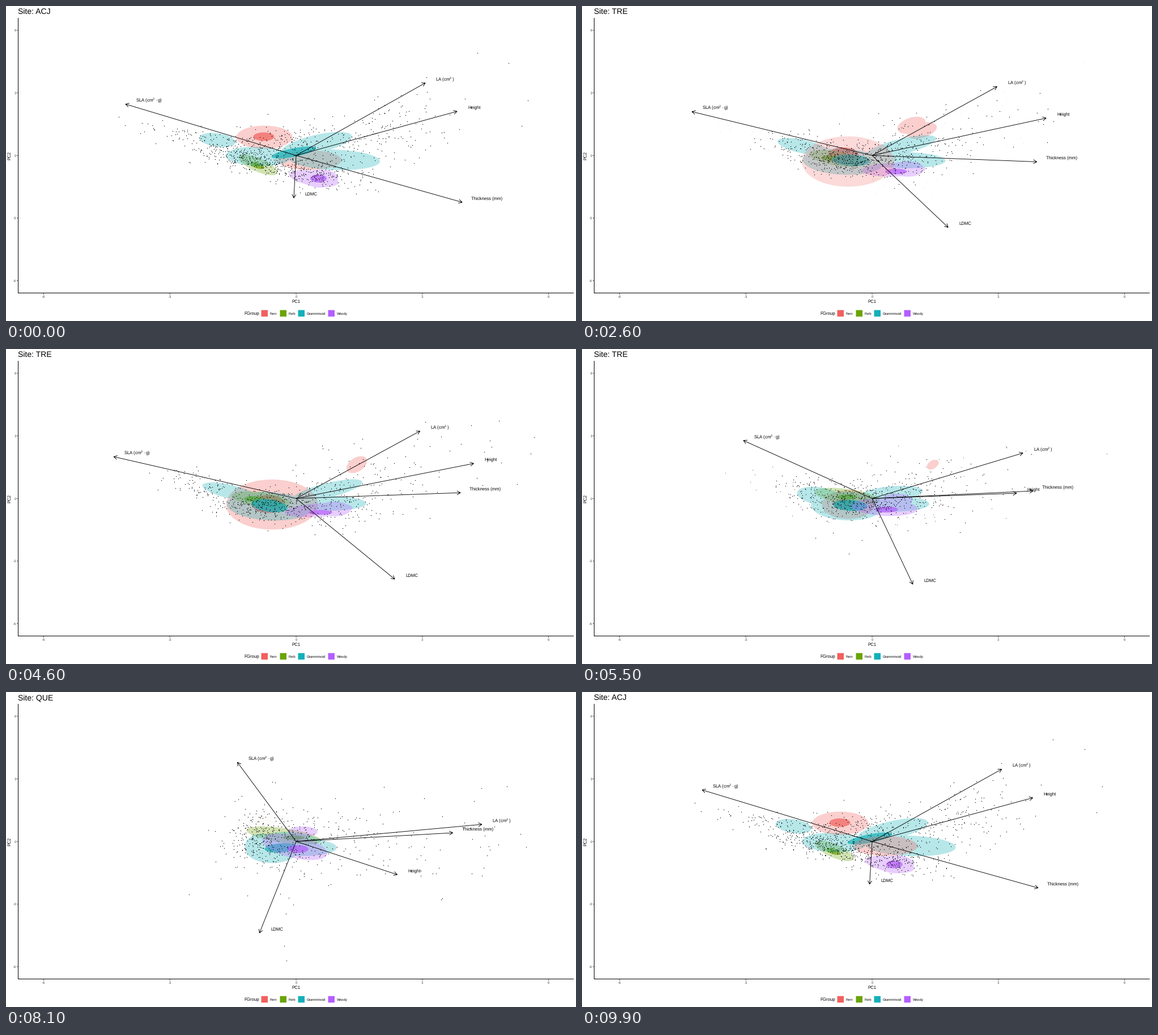
Write a matplotlib script that moves like this. It is 1006 px wide and 557 px high and loops after 10000 ms.

```python
import numpy as np
import matplotlib.pyplot as plt
from matplotlib.animation import FuncAnimation
from matplotlib.patches import PathPatch, Rectangle
from matplotlib.path import Path

W, H, DPI = 1006, 557, 100
PX = 72 / DPI  # points per pixel
ORIGIN = np.array([512, 264.3])
UNIT = np.array([74.27, -36.9])  # pixels per data unit
SITES = ["ACJ", "TRE", "QUE"]
FERN, FORB, GRAM, WOODY = "#f1605c", "#6ba304", "#13b0b8", "#b55eff"

plt.rcParams.update({
    "font.family": "Liberation Sans",
    "mathtext.default": "regular",
    "text.hinting": "none",
})


# ---- density regions: unions of ovals -------------------------------------
def oval(cx, cy, rx, ry, tilt=0):
    th = np.linspace(0, 2 * np.pi, 90)
    x, y = rx * np.cos(th), ry * np.sin(th)
    c, s = np.cos(np.radians(tilt)), np.sin(np.radians(tilt))
    return np.column_stack([cx + c * x - s * y, cy + s * x + c * y])


OUT, IN = 0.3, 0.7
fern_spot = oval(619, 204.5, 20, 12, -33)

# colour, alpha, ovals at each site (None where the region is absent)
LAYERS = [
    (FERN, OUT, [[oval(456, 232, 49.5, 20.5), oval(535.5, 272.5, 56.5, 17.5)],
                 [fern_spot, fern_spot], None]),
    (FERN, OUT, [None, [oval(469.5, 275, 81.5, 44.5)], None]),
    (FERN, IN, [[oval(455, 231, 18.5, 7.5)], [oval(463, 274, 29.5, 16)], None]),
    (FORB, OUT, [[oval(445, 281, 37, 12, 23)], [oval(450, 266, 52, 13, 7)],
                 [oval(491, 253, 67, 13, 8)]]),
    (FORB, IN, [[oval(443.5, 282, 13, 5, 18)], [oval(436, 265, 16, 5)],
                [oval(509.5, 257, 19, 3.8)]]),
    (GRAM, OUT, [
        [oval(373, 237, 32, 12, 8), oval(445, 266, 57, 17, 2),
         oval(548, 244, 64, 16, -13), oval(580, 272, 80, 18, 2)],
        [oval(395, 252, 50, 12, 13), oval(465, 278, 75, 25, 3),
         oval(568, 250, 63, 13, -14), oval(568, 273, 68, 13)],
        [oval(455, 272, 31, 21), oval(470, 277, 47, 26),
         oval(515, 264, 50, 14, 10), oval(525, 275, 57, 15)]]),
    (GRAM, IN, [[oval(508, 259, 40, 7.5, -11)], [oval(465, 277, 32, 11, 8)],
                [oval(484, 276, 28, 8, -4)]]),
    (WOODY, OUT, [[oval(543, 305, 44, 13, 10), oval(555, 305, 31, 16)],
                  [oval(552, 285, 60, 12, -4), oval(580, 283, 29, 13)],
                  [oval(509, 273, 59, 20, 13), oval(523, 246, 26, 9.5)]]),
    (WOODY, IN, [[oval(551.5, 305, 14.5, 7)], [oval(555, 289, 21, 4.2)],
                 [oval(514.5, 277, 18.5, 6.8)]]),
]

# ---- point clouds ---------------------------------------------------------
rng = np.random.default_rng(12)


def cloud(*parts):
    """Shuffled mix of normal clouds: count, centre, spread, correlation."""
    groups = []
    for n, cx, cy, sx, sy, r in parts:
        u, v = rng.normal(size=(2, n))
        groups.append(np.column_stack(
            [cx + sx * u, cy + sy * (r * u + np.sqrt(1 - r * r) * v)]))
    return rng.permutation(np.vstack(groups))


POINTS = [
    cloud((300, 430, 270, 45, 14, .5), (240, 545, 293, 42, 14, .25),
          (230, 510, 242, 70, 16, 0), (90, 335, 234, 50, 16, .75),
          (130, 660, 228, 55, 33, -.5), (10, 830, 165, 80, 45, 0)),
    cloud((330, 460, 276, 50, 15, .2), (90, 345, 240, 35, 14, .5),
          (130, 560, 270, 50, 20, 0), (140, 645, 240, 75, 33, -.3),
          (14, 830, 165, 70, 30, 0)),
    cloud((280, 450, 257, 36, 26, 0), (160, 515, 262, 45, 30, 0),
          (80, 610, 260, 75, 34, 0), (35, 790, 270, 75, 50, 0),
          (18, 470, 270, 70, 110, 0)),
]

# label, gap to the tip, tip at each site
ARROWS = [
    (r"SLA (cm$^2\,$·$\,$g)", 18, [(211, 173.5), (189, 190.8), (413, 123.3)]),
    (r"LA (cm$^2\,$)", 18.5, [(740, 136), (730, 144.7), (842, 236.3)]),
    ("Height", 19, [(796, 186.3), (826, 201.8), (688, 326)]),
    ("Thickness (mm)", 16.5, [(805, 347), (802, 254.2), (788, 246.8)]),
    ("LDMC", 19.5, [(508, 339.3), (687.2, 406.8), (446, 428)]),
]

# ---- static stage ---------------------------------------------------------
fig = plt.figure(figsize=(W / DPI, H / DPI), dpi=DPI, facecolor="white")
ax = fig.add_axes([0, 0, 1, 1])
ax.set(xlim=(0, W), ylim=(H, 0))
ax.axis("off")


def text(x, y, s, px, **kw):
    return ax.text(x, y, s, fontsize=px * PX, **kw)


def line(xs, ys, px=1, color="black", z=1):
    return ax.plot(xs, ys, color=color, lw=px * PX, zorder=z, snap=False,
                   solid_capstyle="butt", solid_joinstyle="round")[0]


line([21.5, 21.5], [21, 508])
line([21, 1002], [507.5, 507.5])
for v in range(-6, 7, 3):
    x, y = ORIGIN + v * UNIT
    line([x, x], [508, 510.5], 0.8, "#333333")
    line([19, 21], [y, y], 0.8, "#333333")
    text(x, 515.8, str(v), 6.2, color="#4d4d4d", ha="center")
    text(18.3, y + 2.2, str(v), 6.2, color="#4d4d4d", ha="right")
text(512, 525, "PC1", 7.8, ha="center")
text(6.5, 264.3, "PC2", 7.8, rotation=90, ha="center", va="center")

text(420, 546.7, "FGroup", 7.9)
for x, name, color in ((450.5, "Fern", FERN), (483.5, "Forb", FORB),
                       (515.5, "Gramminoid", GRAM), (568.5, "Woody", WOODY)):
    ax.add_patch(Rectangle((x, 537.7), 11.5, 11.5, fc=color, ec="none",
                           snap=False))
    text(x + 15.3, 546, name, 6.2)

# ---- moving parts ---------------------------------------------------------
title = text(21.5, 14, "", 14)
patches = [ax.add_patch(PathPatch(Path([(0, 0)]), fc=color, lw=0))
           for color, _, _ in LAYERS]
DOT = (1.3 * PX) ** 2
dots, extra = (ax.scatter([], [], s=DOT, c="black", linewidths=0, zorder=3)
               for _ in range(2))
shafts = [line([], [], 0.9, z=4) for _ in ARROWS]
labels = [text(0, 0, name, 7.8, zorder=5) for name, _, _ in ARROWS]


def phase(k):
    """Site left, site approached and eased progress."""
    for start, steps, a, b in ((11, 22, 0, 1), (45, 22, 1, 2), (79, 21, 2, 0)):
        if k <= start:
            return a, a, 0.0
        if k < start + steps:
            return a, b, (1 - np.cos(np.pi * (k - start) / steps)) / 2
    return 0, 0, 0.0


def blend(p, q, t):
    return (1 - t) * np.asarray(p) + t * np.asarray(q)


def pose_layers(a, b, t):
    for patch, (_, alpha, sites) in zip(patches, LAYERS):
        old, new = sites[a], sites[b]
        patch.set_visible(bool(old or new))
        if not (old or new):
            continue
        if old and new:
            loops = [blend(p, q, t) for p, q in zip(old, new)]
        elif old:  # leaves by shrinking
            loops = [blend(p, p.mean(axis=0), t) for p in old]
        else:      # enters by fading in, on top
            loops, alpha = new, alpha * t
        patch.set_path(Path.make_compound_path(*map(Path, loops)))
        patch.set_alpha(alpha)
        patch.set_zorder(2 if old else 2.5)


def pose_points(a, b, t):
    p, q = POINTS[a], POINTS[b]
    n = min(len(p), len(q))
    dots.set_offsets(blend(p[:n], q[:n], t))
    leaving = len(p) > n
    extra.set_offsets(p[n:] if leaving else q[n:])
    extra.set_sizes([DOT * (1 - t) ** 2 if leaving else DOT])
    extra.set_alpha(1 if leaving else t)


def pose_arrows(a, b, t):
    for shaft, label, (_, gap, tips) in zip(shafts, labels, ARROWS):
        tip = blend(tips[a], tips[b], t)
        back = np.arctan2(*(ORIGIN - tip)[::-1])
        barbs = [tip + 7 * np.array([np.cos(back + s), np.sin(back + s)])
                 for s in (-np.pi / 6, np.pi / 6)]
        shaft.set_data(*np.array([ORIGIN, tip, (np.nan, np.nan),
                                  barbs[0], tip, barbs[1]]).T)
        label.set_position((tip[0] + gap, tip[1] - 4))


def update(k):
    a, b, t = phase(k)
    pose_layers(a, b, t)
    pose_points(a, b, t)
    pose_arrows(a, b, t)
    # the title names the nearer site
    title.set_text("Site: " + SITES[b if t > 0.54 else a])
    return []


anim = FuncAnimation(fig, update, frames=100, interval=100, repeat=True,
                     repeat_delay=0, init_func=lambda: update(0))
plt.show()
```
